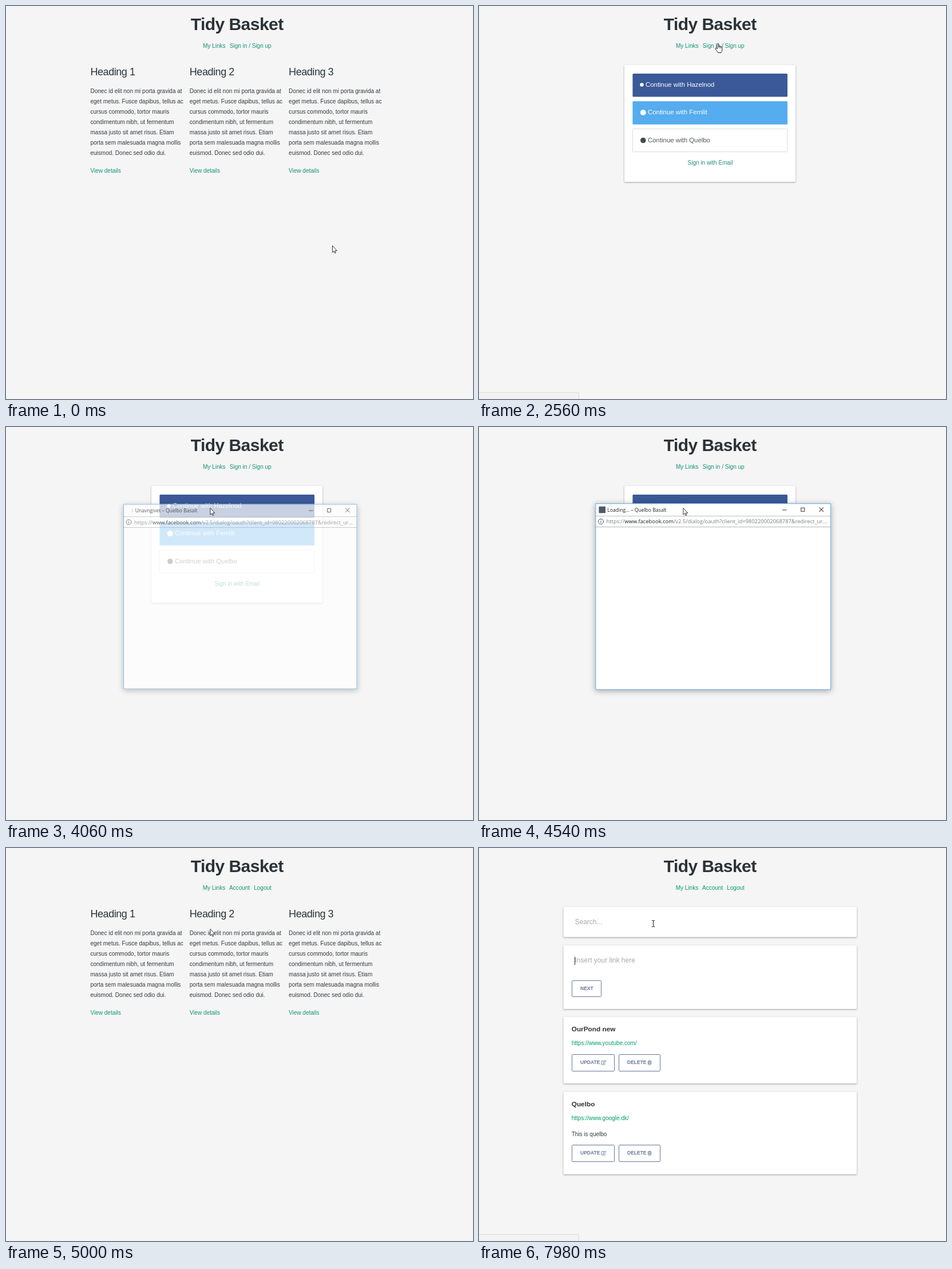
These frames come from a looping animation (816 px wide and 686 px high, 8000 ms). An HTML page with a canvas:

```html
<!DOCTYPE html>
<html lang="en">
<head>
<meta charset="utf-8">
<title>Tidy Basket</title>
<style>
html, body { margin: 0; width: 100%; height: 100%; overflow: hidden; background: #f5f5f5; }
canvas { display: block; }
</style>
</head>
<body>
<canvas id="stage" width="816" height="686"></canvas>
<script>
const ctx = document.getElementById('stage').getContext('2d');
const LOOP = 8000;
const SANS = '"Liberation Sans", Arial, sans-serif';
const UI = '"Open Sans", "Noto Sans", sans-serif';
const INK = '#2b3337', BODY = '#333b3f', STEEL = '#66779b';
const GREEN = '#12946f', BRIGHT = '#009e6c';

const T = { login: 2470, barOff: 3590, popup: 3900, loading: 4520, account: 4770, closed: 5000, links: 6730 };

const LOREM = [
  'Donec id elit non mi porta gravida at',
  'eget metus. Fusce dapibus, tellus ac',
  'cursus commodo, tortor mauris',
  'condimentum nibh, ut fermentum',
  'massa justo sit amet risus. Etiam',
  'porta sem malesuada magna mollis',
  'euismod. Donec sed odio dui.'
];

// Pointer moves: start, end, number of steps, target x, y
const START = [570, 418];
const MOVES = [
  [690, 1470, 11, 395, 93],
  [1540, 1630, 2, 384, 80],
  [2100, 2240, 3, 417, 65],
  [3110, 3350, 4, 356.5, 141],
  [5870, 6500, 9, 364.3, 67],
  [7670, 7980, 5, 304, 132]
];

const HAND = new Path2D('M4 10V1.5a1.2 1.2 0 0 1 2.4 0V6a1 1 0 0 1 2.1 .2a1 1 0 0 1 2 .4a1 1 0 0 1 2 .6V12c0 2-1 3-1.4 4.5H5.4C4.5 14 2 12 .8 9.8C.2 8.3 1.8 7.8 2.6 8.8L4 10Z');
const KNUCKLES = new Path2D('M6.4 5.5V8.5M8.5 6V8.7M10.5 6.5V9');
const ARROW = new Path2D('M.4 .4V12.2L3 9.8L4.7 13.5L6.3 12.8L4.7 9.1H8.3Z');
const BEAM = new Path2D('M-2.5 -5.5H-.8L0 -5L.8 -5.5H2.5M0 -5V5M-2.5 5.5H-.8L0 5L.8 5.5H2.5');
const EDIT = new Path2D('M6.2 1.2H1.6Q.5 1.2 .5 2.3V6.6Q.5 7.6 1.6 7.6H6Q7 7.6 7 6.6V5.2M3.2 5.6L3.5 4.2L7.4 .4L8.6 1.6L4.7 5.4Z');
const TRASH = new Path2D('M.2 1.8H6.8M2.2 1.7L2.7 .5H4.3L4.8 1.7M1 1.8V7Q1 7.8 1.8 7.8H5.2Q6 7.8 6 7V1.8M2.5 3.3V6.3M3.5 3.3V6.3M4.5 3.3V6.3');

function text(str, x, y, size, color, opt = {}) {
  ctx.font = `${opt.bold ? 'bold ' : ''}${size}px ${opt.font || SANS}`;
  ctx.letterSpacing = `${opt.spacing || 0}px`;
  ctx.textAlign = opt.align || 'left';
  ctx.fillStyle = color;
  ctx.fillText(str, x, y);
  const width = ctx.measureText(str).width;
  ctx.letterSpacing = '0px';
  return width;
}

function rect(x, y, w, h, fill, radius = 0) {
  ctx.beginPath();
  ctx.roundRect(x, y, w, h, radius);
  ctx.fillStyle = fill;
  ctx.fill();
}

function frame(x, y, w, h, color, radius = 0) {
  ctx.beginPath();
  ctx.roundRect(x + .5, y + .5, w - 1, h - 1, radius);
  ctx.strokeStyle = color;
  ctx.lineWidth = 1;
  ctx.stroke();
}

function line(x1, y1, x2, y2, color, width = 1) {
  ctx.beginPath();
  ctx.moveTo(x1, y1);
  ctx.lineTo(x2, y2);
  ctx.strokeStyle = color;
  ctx.lineWidth = width;
  ctx.stroke();
}

function dot(x, y, r, color) {
  ctx.beginPath();
  ctx.arc(x, y, r, 0, Math.PI * 2);
  ctx.fillStyle = color;
  ctx.fill();
}

function strokeAt(path, x, y, color, width) {
  ctx.save();
  ctx.translate(x, y);
  ctx.strokeStyle = color;
  ctx.lineWidth = width;
  ctx.stroke(path);
  ctx.restore();
}

function card(x, y, w, h) {
  ctx.save();
  ctx.shadowColor = 'rgba(0,0,0,.36)';
  ctx.shadowBlur = 3;
  ctx.shadowOffsetY = 1;
  rect(x, y, w, h, '#fff', 1.5);
  ctx.restore();
}

function header(signedIn, green) {
  text('Tidy Basket', 403.7, 42, 30, INK, { bold: true, spacing: -.55, align: 'center' });
  const items = signedIn
    ? [['My Links', 343.7], ['Account', 390], ['Logout', 433.2]]
    : [['My Links', 344], ['Sign in / Sign up', 390.8]];
  for (const [label, x] of items) text(label, x, 73, 10, green);
}

function home() {
  for (let col = 0; col < 3; col++) {
    const x = 147.5 + col * 173.3;
    text(`Heading ${col + 1}`, x, 121, 18, INK, { spacing: -.45 });
    LOREM.forEach((row, i) => text(row, x, Math.round(152.4 + 17.85 * i), 10, BODY));
    text('View details', x, 291, 10, GREEN);
  }
}

function login() {
  card(254, 103, 299, 204);
  rect(268.4, 118, 270.6, 40.5, '#3b5998', 1.5);
  rect(268.4, 166.2, 270.6, 40.6, '#55acee', 1.5);
  frame(268, 214, 271, 41, '#dcdcdc', 1);
  dot(284.5, 137.5, 3.2, '#fff');
  dot(286.8, 186, 5, '#fff');
  dot(286.8, 234.5, 4.8, '#444b50');
  text('Continue with Hazelnod', 291, 141, 11.4, '#fff');
  text('Continue with Fernlit', 295, 189, 11.4, '#fff');
  text('Continue with Quelbo', 295, 238, 11.4, '#50585d');
  text('Sign in with Email', 404, 277, 10, '#258c7c', { align: 'center' });
}

function button(label, x, y, w, h, icon) {
  frame(x, y, w, h, STEEL, 1);
  const width = text(label, x + 15, y + 17, 8.5, STEEL, { bold: true });
  if (icon) strokeAt(icon, x + 17 + width, y + 10.5, STEEL, .9);
}

function entry(y, h, title, url, note) {
  card(147.5, y, 512.5, h);
  text(title, 161.7, y + 25, 11.8, INK, { bold: true });
  text(url, 161.7, y + 49, 10, BRIGHT);
  if (note) text(note, 161.7, y + 77, 10, BODY);
  const top = Math.floor(y + (note ? 93 : 65));
  button('UPDATE', 162, top, 75, 30, EDIT);
  button('DELETE', 244, top, 73, 30, TRASH);
}

function links(t) {
  card(147.5, 103, 512.5, 52.5);
  text('Search...', 167.5, 133, 12, '#a9a9a9');
  card(147.5, 170, 512.5, 111);
  text('Insert your link here', 167.5, 200, 12, '#a9a9a9');
  if (t < 7220 || t >= 7745) rect(167, 190, 1, 14, '#222');
  button('NEXT', 162, 231, 52, 29);
  entry(295, 116, 'OurPond new', 'https://www.youtube.com/');
  entry(425.5, 144, 'Quelbo', 'https://www.google.dk/', 'This is quelbo');
}

function statusBar() {
  rect(-4, 674, 179, 20, '#dadada', 3);
  rect(-4, 675, 178, 20, '#f2f2f2', 2);
}

function addressBar() {
  line(205, 156.5, 613, 156.5, '#b9c0c6');
  line(205, 175.5, 613, 175.5, '#b5b5b5');
  ctx.beginPath();
  ctx.arc(214.5, 166, 4.4, 0, Math.PI * 2);
  ctx.strokeStyle = '#555';
  ctx.lineWidth = 1;
  ctx.stroke();
  rect(214, 165.3, 1, 3.2, '#555');
  rect(214, 163.4, 1, 1, '#555');
  const parts = [
    ['https://', '#7d7d7d'],
    ['www.facebook.com', '#1f1f1f'],
    ['/v2.5/dialog/oauth?client_id=980220002068787&redirect_ur...', '#7d7d7d']
  ];
  let x = 224;
  for (const [str, color] of parts) x += text(str, x, 169.5, 9.3, color, { font: UI });
}

function windowButtons() {
  line(529, 146, 536.5, 146, '#333');
  frame(561, 142, 7, 7, '#333');
  line(593, 141.5, 600.5, 149, '#333');
  line(593, 149, 600.5, 141.5, '#333');
}

function popup(t) {
  const step = Math.floor((t - T.popup) / 78 + .01);
  const closing = t >= T.account;
  let alpha = Math.min(1, .28 + .22 * step);
  let scale = [.972, .989, 1, 1.005][step] || 1.008;
  if (closing) {
    const k = t < 4850 ? 0 : t < 4930 ? 1 : 2;
    alpha = [.85, .56, .2][k];
    scale = [1.004, .994, .975][k];
  }
  const x = 205, y = 134.5, w = 408.5, h = 323;
  ctx.save();
  ctx.translate(409.25, 296);
  ctx.scale(scale, scale);
  ctx.translate(-409.25, -296);
  ctx.globalAlpha = alpha;

  // Shadow only outside the window, so the translucent body stays clean
  ctx.save();
  ctx.beginPath();
  ctx.rect(-50, -50, 916, 786);
  ctx.rect(x, y, w, h);
  ctx.clip('evenodd');
  ctx.shadowColor = 'rgba(0,0,0,.32)';
  ctx.shadowBlur = 10;
  ctx.shadowOffsetY = 2;
  rect(x, y, w, h, '#fff');
  ctx.restore();

  const loading = t >= T.loading;
  if (closing) {
    rect(x, y, w, 21.5, '#fff');
    rect(x, y + 21.5, w, h - 21.5, '#000');
  } else {
    rect(x, y, w, h, '#fff');
    addressBar();
    windowButtons();
  }
  if (loading) {
    rect(211, 140, 11.5, 11.5, '#4d5a66', 1);
  } else {
    const spin = step * .9 - 2.8;
    ctx.beginPath();
    ctx.arc(217, 146, 4, spin, spin + 2);
    ctx.strokeStyle = '#b4b4b4';
    ctx.lineWidth = 1;
    ctx.stroke();
  }
  text(`${loading ? 'Loading...' : 'Unavngivet'} – Quelbo Basalt`, 225.8, 149, 8.5, '#222', { font: UI });
  frame(x, y, w, h, '#5b9fd6');
  ctx.restore();
}

function pointerAt(t) {
  let [x, y] = START;
  for (const [from, to, steps, tx, ty] of MOVES) {
    if (t < from) break;
    const k = Math.floor((t - from) / ((to - from) / (steps - 1)) + .01) + 1;
    const p = Math.min(1, k / steps);
    const e = p * p * (3 - 2 * p);
    x += (tx - x) * e;
    y += (ty - y) * e;
  }
  return [x, y];
}

function pointer(t) {
  const [x, y] = pointerAt(t);
  const onButton = t >= T.login && t < T.popup && y > 117;
  ctx.save();
  ctx.lineJoin = 'round';
  if (t >= T.links && y >= 113) {
    strokeAt(BEAM, x + .5, y, '#111', 1);
  } else if (y < 76 || onButton) {
    ctx.translate(x - 4.8, y);
    ctx.fillStyle = '#fff';
    ctx.fill(HAND);
    strokeAt(HAND, 0, 0, '#111', .9);
    strokeAt(KNUCKLES, 0, 0, '#111', .7);
  } else {
    ctx.translate(x, y);
    ctx.fillStyle = '#fff';
    ctx.fill(ARROW);
    strokeAt(ARROW, 0, 0, '#111', .85);
  }
  ctx.restore();
}

function draw(t) {
  rect(0, 0, 816, 686, '#f5f5f5');
  const onLinks = t >= T.links;
  header(t >= T.account, onLinks ? BRIGHT : GREEN);
  if (onLinks) links(t);
  else if (t >= T.login && t < T.account) login();
  else home();
  if (onLinks || (t >= T.login && t < T.barOff)) statusBar();
  if (t >= T.popup && t < T.closed) popup(t);
  pointer(t);
}

function tick() {
  draw(performance.now() % LOOP);
  requestAnimationFrame(tick);
}
tick();
</script>
</body>
</html>
```
